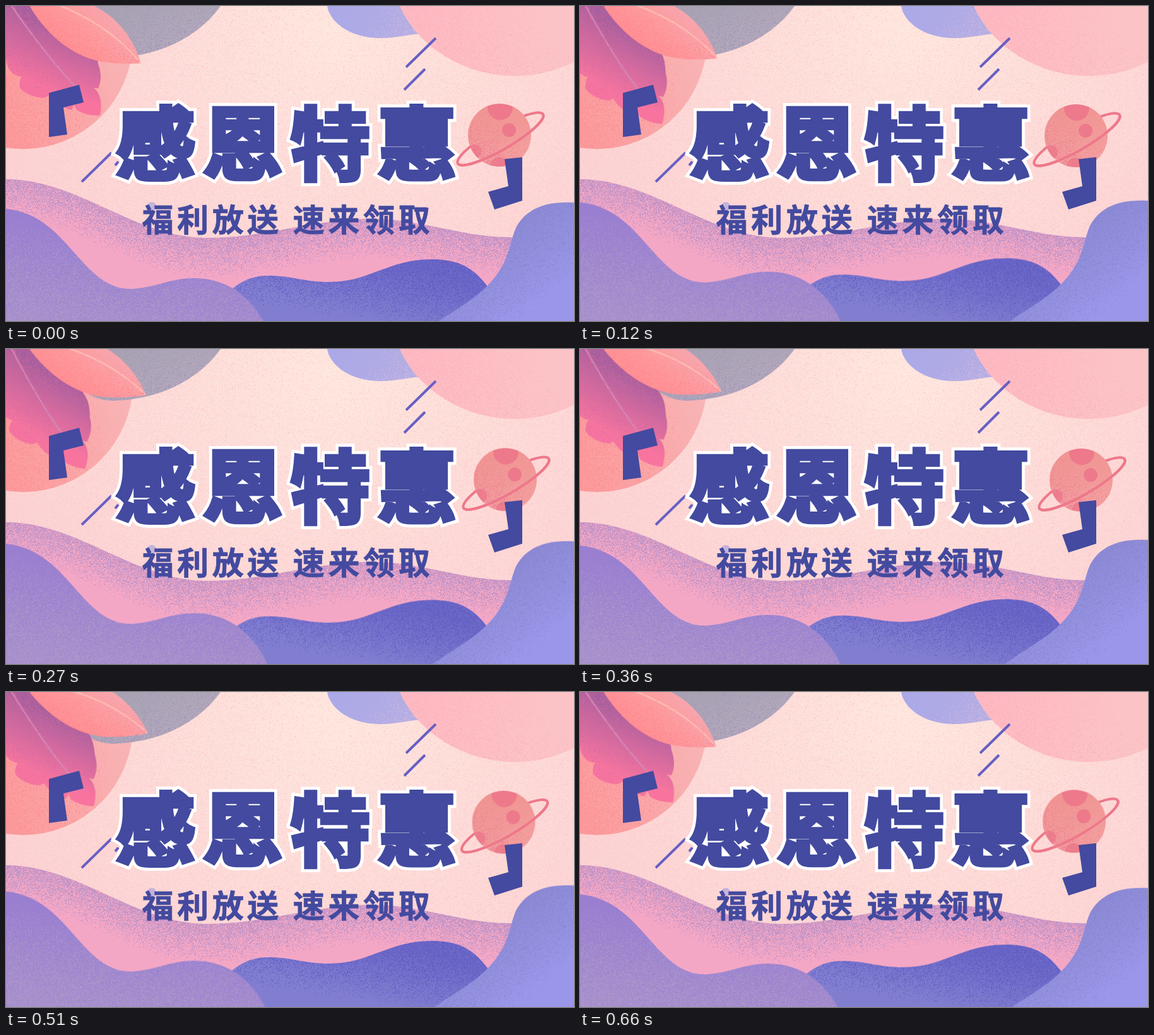
These frames come from a looping animation (900x500 px, 690 ms). An HTML page with a canvas:

```html
<!DOCTYPE html>
<html lang="zh-CN">
<head>
<meta charset="utf-8">
<style>
html, body { margin: 0; width: 100%; height: 100%; overflow: hidden; background: #fddcd8; }
canvas, svg { position: absolute; left: 0; top: 0; width: 900px; height: 500px; }
text { font-family: "Noto Sans CJK SC", "Noto Sans CJK", "Noto Sans SC", sans-serif; fill: #434a9f; }
.title { font-size: 126px; font-weight: 900; letter-spacing: 12.2px; stroke-miterlimit: 3; }
.halo { stroke: #fff; stroke-width: 16px; }
.heavy { stroke: #434a9f; stroke-width: 6.5px; }
.sub { font-size: 50px; font-weight: 700; letter-spacing: 5.6px; stroke: #434a9f; stroke-width: 0.8px; }
</style>
</head>
<body>
<canvas id="stage" width="900" height="500"></canvas>
<svg viewBox="0 0 900 500">
  <defs><text id="title" class="title" x="174" y="266">感恩特惠</text></defs>
  <path d="M681 51L634 97M664 100L631 133M167 233L120 279M178 247L173 253" stroke="#675fc4" stroke-width="4"/>
  <circle cx="231" cy="318" r="7" fill="#c5b3da"/>
  <path d="M68 138L116 125L123 153L91 161L97 204L68 208ZM790 243L818 240V309L774 323L764 295L796 286Z" fill="#434a9f"/>
  <use href="#title" class="halo"/>
  <use href="#title" class="heavy"/>
  <text class="sub" x="215.500" y="357.500">福利放送 速来领取</text>
</svg>
<script>
const STEP = 30, STEPS = 23, PAD = 50, W = 1000, H = 600;
const ctx = document.getElementById('stage').getContext('2d');

let seed = 7;
const random = () => (seed = (seed * 1664525 + 1013904223) >>> 0) / 4294967296;
const ramp = (v, from, to) => Math.min(1, Math.max(0, (v - from) / (to - from)));

function withStops(gradient, colors) {
  colors.forEach((c, i) => gradient.addColorStop(i / (colors.length - 1), c));
  return gradient;
}
const linear = (x0, y0, x1, y1, ...colors) => withStops(ctx.createLinearGradient(x0, y0, x1, y1), colors);
const radial = (x, y, r, ...colors) => withStops(ctx.createRadialGradient(x, y, 0, x, y, r), colors);

// Scattered one-pixel speckles; density(x, y) is the chance of a speckle.
function speckles(color, density) {
  const c = new OffscreenCanvas(W, H), g = c.getContext('2d');
  const image = g.createImageData(W, H);
  const rgb = [1, 3, 5].map(i => parseInt(color.slice(i, i + 2), 16));
  for (let i = 0; i < W * H; i++) {
    if (random() < density(i % W - PAD, Math.floor(i / W) - PAD)) image.data.set([...rgb, 255], i * 4);
  }
  g.putImageData(image, 0, 0);
  return c;
}

// Pre-renders a filled shape with optional details and grain on top.
function layer(path, fill, grain, density, details) {
  const c = new OffscreenCanvas(W, H), g = c.getContext('2d');
  g.translate(PAD, PAD);
  g.fillStyle = fill;
  g.fill(new Path2D(path));
  g.globalCompositeOperation = 'source-atop';
  if (details) details(g);
  g.drawImage(speckles(grain, density), -PAD, -PAD);
  return c;
}

function vein(g, path, color) {
  g.strokeStyle = color;
  g.lineWidth = 2.5;
  g.stroke(new Path2D(path));
}

// Height of the far hill, eased between its crests and troughs.
const knots = [[-60, 275], [0, 275], [318, 368], [580, 338], [800, 367], [960, 367]];
function crest(x) {
  const i = Math.max(1, knots.findIndex(k => k[0] >= x));
  const [x0, y0] = knots[i - 1], [x1, y1] = knots[i];
  return y0 + (y1 - y0) * (1 - Math.cos(Math.PI * ramp(x, x0, x1))) / 2;
}
let hillPath = 'M-50 560';
for (let x = -50; x <= 950; x += 5) hillPath += `L${x} ${crest(x)}`;
hillPath += 'V560Z';

const still = [
  layer('M-50-50H950V550H-50Z', radial(520, 30, 620, '#fee7df', '#fddbd8', '#fcd1d3'), '#fbcbcc',
    (x, y) => 0.05 + 0.2 * ramp(Math.hypot(x - 520, y - 30), 0, 600)),
  layer('M-147 53A174 174 0 0 1 201 53A174 174 0 0 1-147 53Z', linear(0, 180, 200, 90, '#fc9c9e', '#f8b4b5'), '#fb9093',
    (x, y) => 0.4 * ramp(x, 160, -20)),
  layer('M100-40H355L340 0C312 40 252 82 165 82C135 80 110 60 100 40Z', linear(200, 0, 230, 82, '#a8a2b3', '#b6aabd'), '#a197b6',
    (x, y) => 0.1 + 0.25 * ramp(y, 0, 85)),
  layer('M505-40L509 0C512 22 540 50 592 51C620 51 640 44 670 43L700-40Z', linear(520, 10, 650, 40, '#aca9e8', '#b2ace3'), '#c9b5df',
    (x, y) => 0.5 * ramp(x + y, 600, 710)),
  layer('M600-50L624 0C650 62 725 111 805 111C845 111 875 102 910 84V-50Z', linear(640, 10, 840, 90, '#ffb9c2', '#fcc3c6'), '#f9b1ba',
    (x, y) => 0.3 * ramp(x - y, 840, 560)),
  layer(hillPath, '#f4a7c5', '#bf93c6', (x, y) => 0.7 * ramp(y - crest(x), 65, 0))
];

const plume = layer(
  'M-45-45H60Q95 10 120 47Q142 58 146 92Q154 113 146 131L139 130Q155 143 149 174Q125 174 112 165L108 156' +
  'L104 165Q82 160 68 142L61 146Q35 145 22 130Q20 120 25 112Q3 110 1 86L-45 55Z',
  linear(105, 42, 72, 132, '#a85f9d', '#d36a9f', '#f8749f'), '#cf689f',
  (x, y) => 0.15 * ramp(y, 145, 60),
  g => {
    g.fillStyle = linear(60, 20, 20, 110, '#ae609d', '#f5749f');
    g.fill(new Path2D('M-45-45L5-6Q60 75 110 128L100 180L-45 150Z'));
    vein(g, 'M5-6Q60 75 110 128', '#d586b4');
  });

const leaf = layer(
  'M38 1C60 38 98 78 150 88Q182 93 214 91C203 55 180 20 140 0Q85-32 38 1Z',
  linear(95, 70, 160, 10, '#ff9094', '#fd9a9d', '#f7a5ad'), '#ff858d',
  (x, y) => 0.3 * ramp(y - x / 2, -50, 25),
  g => vein(g, 'M60-10Q158 22 214 91', '#fdbbb2'));

const blueWave = layer(
  'M330 475C360 445 380 428 415 428C455 428 470 438 512 438C577 438 605 402 675 402C725 402 745 422 763 445L800 500V560H330Z',
  linear(600, 400, 570, 500, '#706cca', '#817ed0'), '#625ec3',
  (x, y) => 0.6 * ramp(y - (x - 500) * 0.12, 490, 390));

const leftWave = layer(
  'M-50 318L0 322C54 327 84 364 114 398C142 430 165 449 197 449C235 448 260 432 297 432C350 432 385 460 408 500L435 560H-50Z',
  linear(60, 340, 30, 500, '#9a7fd0', '#a28bce'), '#ad97ca',
  (x, y) => 0.55 * ramp(y - x * 0.15, 340, 500));

const rightWave = layer(
  'M950 313L900 312C850 309 822 325 808 352C798 375 798 400 775 430C750 462 715 480 686 500L640 530V560H950Z',
  linear(800, 350, 870, 450, '#8d8ad7', '#9a97ea'), '#8885cf',
  (x, y) => 0.4 * ramp(x + y, 1330, 1130));

const planet = layer(
  'M732 205A50 50 0 0 1 832 205A50 50 0 0 1 732 205Z',
  linear(770, 160, 790, 255, '#f09492', '#f4a0a0'), '#ec8391',
  (x, y) => 0.4 * ramp(x - y, 610, 490),
  g => {
    g.fillStyle = '#ed798b';
    for (const [x, y, r] of [[783, 161, 20], [797, 197, 11], [742, 231, 11], [781, 254, 14]]) {
      g.beginPath();
      g.arc(x, y, r, 0, 7);
      g.fill();
    }
  });

function put(image, dx = 0, dy = 0) {
  ctx.drawImage(image, dx - PAD, dy - PAD);
}

function swing(image, x, y, degrees) {
  ctx.save();
  ctx.translate(x, y);
  ctx.rotate(degrees * Math.PI / 180);
  put(image, -x, -y);
  ctx.restore();
}

function ring(dx, dy, end) {
  ctx.strokeStyle = '#ee788b';
  ctx.lineWidth = 4;
  ctx.beginPath();
  ctx.ellipse(783.5 + dx, 211 + dy, 78, 17, -Math.PI / 6, 0, end);
  ctx.stroke();
}

function draw(now) {
  const step = Math.floor(now / STEP) % STEPS;
  // Rises linearly until the given step, then falls back by the end of the loop.
  const upDown = peak => step < peak ? step / peak : (STEPS - step) / (STEPS - peak);
  const quick = upDown(6), even = upDown(12);

  still.forEach(image => put(image));
  swing(plume, 10, 0, 9 * quick);
  swing(leaf, 38, 1, -9.8 * upDown(15.7));
  put(blueWave, 0, -7 * upDown(17));
  put(leftWave, 0, -15.5 * quick);
  put(rightWave, 0, -9 * even);

  const dx = 12 * even, dy = 3 * even;
  ring(dx, dy, Math.PI * 2);
  put(planet, dx, dy);
  ring(dx, dy, Math.PI);
  requestAnimationFrame(draw);
}
requestAnimationFrame(draw);
</script>
</body>
</html>
```
